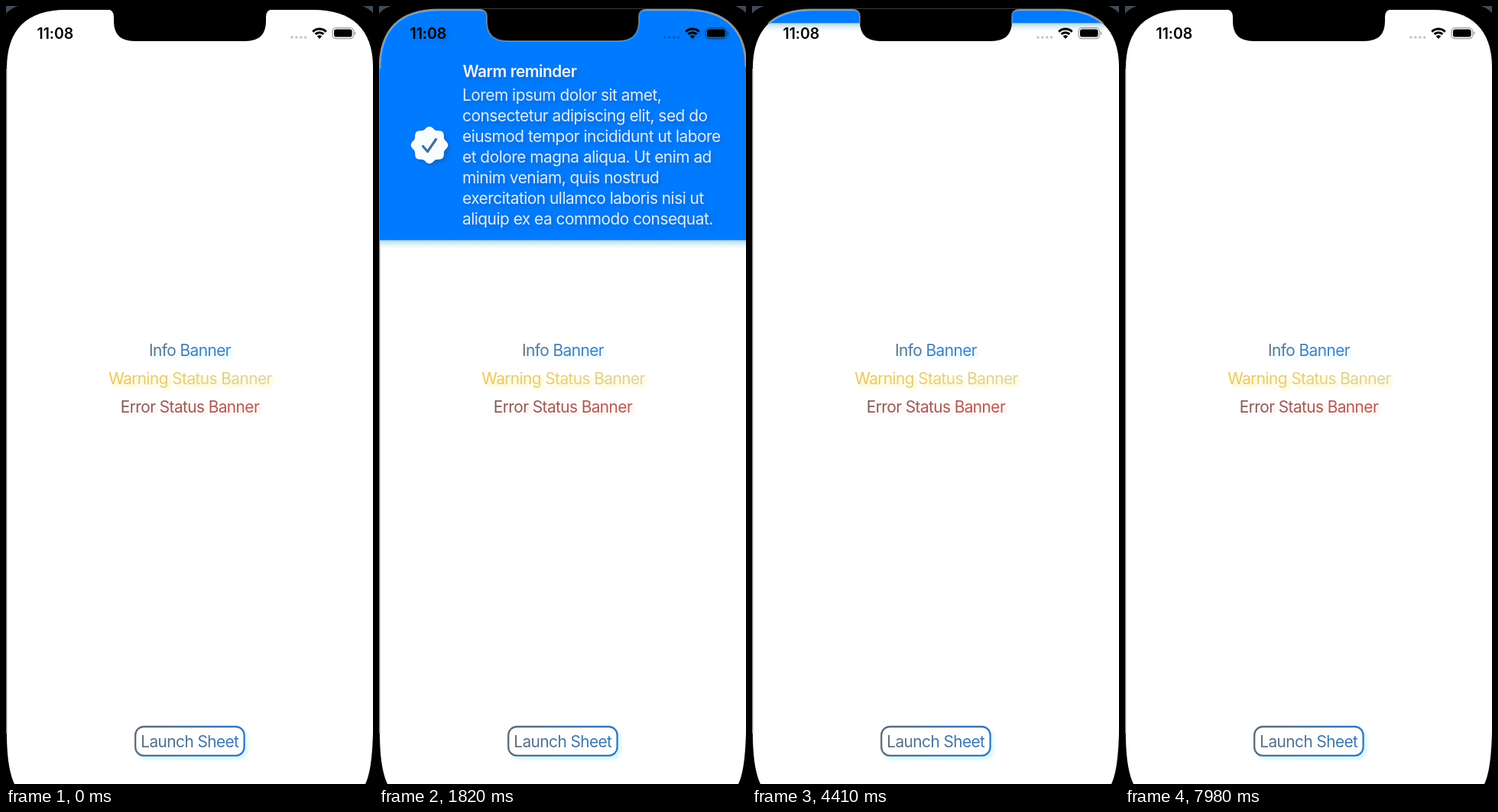
An HTML page that plays this animation: 480x1018 px, repeating every 8000 ms.

```html
<!DOCTYPE html>
<html lang="en">
<head>
<meta charset="utf-8">
<title>Status banners</title>
<style>
  html, body { margin: 0; width: 100%; height: 100%; overflow: hidden; background: #000; }
  svg { display: block; width: 100vw; height: 100vh; }
  text { font: 400 20.85px Inter, "Liberation Sans", sans-serif; letter-spacing: -.49px; }
  .mid { text-anchor: middle; }
  .button { letter-spacing: -.58px; }
  .bold { font-weight: 600; }
  .clock { font-size: 19.5px; letter-spacing: -.1px; }
  .info { filter: drop-shadow(4px 4px 2px rgba(150, 235, 255, .42)); }
  .warn { filter: drop-shadow(4px 4px 2px rgba(255, 236, 90, .55)); }
  .error { filter: drop-shadow(4px 4px 2px rgba(255, 180, 170, .35)); }
  .onBlue { filter: drop-shadow(3px 3px 2px rgba(60, 80, 115, .55)); }
  .onYellow { filter: drop-shadow(3px 3px 2px rgba(140, 105, 0, .4)); }
</style>
</head>
<body>
<svg viewBox="0 0 480 1018" preserveAspectRatio="none">
  <defs>
    <clipPath id="screenClip"><use href="#screen"/></clipPath>
    <clipPath id="coverClip"><rect id="cover" width="480" height="0"/></clipPath>
    <linearGradient id="gInfo" gradientUnits="userSpaceOnUse" x1="187" y1="0" x2="294" y2="0">
      <stop stop-color="#66727f"/><stop offset=".5" stop-color="#447db9"/><stop offset="1" stop-color="#3583d6"/>
    </linearGradient>
    <linearGradient id="gWarn" gradientUnits="userSpaceOnUse" x1="134" y1="0" x2="348" y2="0">
      <stop stop-color="#ebc566"/><stop offset=".5" stop-color="#e4cf80"/><stop offset="1" stop-color="#dbd1ad"/>
    </linearGradient>
    <linearGradient id="gError" gradientUnits="userSpaceOnUse" x1="149" y1="0" x2="332" y2="0">
      <stop stop-color="#7a5d5a"/><stop offset=".5" stop-color="#a35a55"/><stop offset="1" stop-color="#c1564e"/>
    </linearGradient>
    <linearGradient id="gSheet" gradientUnits="userSpaceOnUse" x1="169" y1="0" x2="312" y2="0">
      <stop stop-color="#5f6b78"/><stop offset=".5" stop-color="#47749d"/><stop offset="1" stop-color="#3578bf"/>
    </linearGradient>
    <linearGradient id="glow" x2="0" y2="1">
      <stop stop-color="#86c6e2" stop-opacity=".7"/><stop offset="1" stop-color="#d4f0fa" stop-opacity="0"/>
    </linearGradient>
    <linearGradient id="shade" x2="0" y2="1">
      <stop stop-color="#99958a" stop-opacity=".5"/><stop offset="1" stop-color="#ddd" stop-opacity="0"/>
    </linearGradient>
  </defs>

  <path d="M0 0H16Q6 3 0 10ZM480 0H466Q474 3 480 9Z" fill="#414b55"/>
  <path id="screen" fill="#fff" d="M1 82C1 30 28 5 78 5H402C452 5 480 30 480 80V950C479 985 476 1005 470 1018H11C5 1005 1 985 1 950Z"/>
  <rect y="82" width="1.3" height="870" fill="#7b7b7b"/>

  <text class="mid button info" x="240.5" y="458" fill="url(#gInfo)">Info Banner</text>
  <text class="mid button warn" x="241" y="495" fill="url(#gWarn)">Warning Status Banner</text>
  <text class="mid button error" x="240.5" y="532" fill="url(#gError)">Error Status Banner</text>
  <g class="info">
    <rect x="169.2" y="943" width="142.4" height="37.8" rx="11" fill="#fff" stroke="url(#gSheet)" stroke-width="2.3"/>
    <text class="mid button" x="240.3" y="970" fill="url(#gSheet)">Launch Sheet</text>
  </g>

  <g clip-path="url(#screenClip)">
    <g id="blue">
      <rect y="306.5" width="480" height="12" fill="url(#glow)"/>
      <rect y="-40" width="480" height="346.5" fill="#007aff"/>
      <g class="onBlue">
        <path id="seal" fill="#f7fdff"/>
        <path d="M57.5 183.5L63.5 190.5L74.5 174.5" fill="none" stroke="#426f9c" stroke-width="3.2" stroke-linecap="round" stroke-linejoin="round"/>
      </g>
      <g id="copy" class="onBlue" fill="#d8eefc">
        <text class="bold" x="109.5" y="93" fill="#e6f5ff">Warm reminder</text>
      </g>
    </g>
    <g id="yellow">
      <rect y="114" width="480" height="11" fill="url(#shade)"/>
      <rect y="-40" width="480" height="154" fill="#ffcc00"/>
      <text class="mid onYellow" x="240.5" y="93" fill="#241c04">Running out of time!</text>
    </g>
  </g>

  <g clip-path="url(#coverClip)" fill="none" stroke="#a3a29c" stroke-opacity=".7" stroke-width="3">
    <use href="#rim"/>
    <use href="#notch"/>
  </g>
  <path id="rim" fill="none" d="M1 82C1 30 28 5 78 5H402C452 5 480 30 480 80"/>
  <path id="notch" d="M132 4Q141 5 141 14V20Q141 46 168 46H313Q340 46 340 20V14Q340 5 349 4Z" stroke="none"/>
  <g clip-path="url(#coverClip)" fill="none" stroke="#a3a29c" stroke-opacity=".6" stroke-width="2">
    <path d="M132 5Q141 5 141 14V20Q141 46 168 46H313Q340 46 340 20V14Q340 5 349 5"/>
    <path d="M1 82C1 30 28 5 78 5H132M349 5H402C452 5 480 30 480 80"/>
  </g>

  <g id="status">
    <text class="bold clock" x="40.5" y="42.5">11:08</text>
    <g id="dots" fill-opacity=".23"></g>
    <path d="M401.3 33.6A12.3 12.3 0 0 1 418.7 33.6M404.6 36.9A7.7 7.7 0 0 1 415.4 36.9" fill="none" stroke="#000" stroke-width="2.9"/>
    <path d="M410 43L406.7 39.6A4.7 4.7 0 0 1 413.3 39.6Z"/>
    <rect x="427" y="28.6" width="27.6" height="14" rx="4.5" fill="none" stroke="#000" stroke-opacity=".38" stroke-width="1.3"/>
    <rect x="429" y="30.6" width="23.6" height="10" rx="2.8"/>
    <path d="M456 33Q458.6 35.6 456 38.2Z" fill-opacity=".45"/>
  </g>
</svg>
<script>
const LOOP = 8000, STEP = 70, SETTLE = 650;
const $ = id => document.getElementById(id);

function add(parent, tag, attrs, text) {
  const el = document.createElementNS("http://www.w3.org/2000/svg", tag);
  for (const k in attrs) el.setAttribute(k, attrs[k]);
  if (text) el.textContent = text;
  parent.appendChild(el);
}

["Lorem ipsum dolor sit amet,", "consectetur adipiscing elit, sed do",
 "eiusmod tempor incididunt ut labore", "et dolore magna aliqua. Ut enim ad",
 "minim veniam, quis nostrud", "exercitation ullamco laboris nisi ut",
 "aliquip ex ea commodo consequat."
].forEach((line, i) => add($("copy"), "text", { x: 109, y: 124 + 27 * i }, line));

for (let i = 0; i < 4; i++) add($("dots"), "circle", { cx: 374 + 5.9 * i, cy: 41, r: 1.8 });

// eight soft lobes around the check mark
let seal = "";
for (let i = 0; i < 96; i++) {
  const a = i / 96 * 2 * Math.PI, r = 22.6 + 1.7 * Math.cos(8 * a);
  seal += (i ? "L" : "M") + (66 + r * Math.cos(a)).toFixed(2) + " " + (182 + r * Math.sin(a)).toFixed(2);
}
$("seal").setAttribute("d", seal + "Z");

// share of the way left to go, ms after the start
function spring(ms) {
  if (ms <= 0) return 1;
  if (ms >= SETTLE) return 0;
  const t = ms / 1000, w = 2 * Math.PI / 0.55, z = 0.825;
  const d = w * Math.sqrt(1 - z * z);
  return Math.exp(-z * w * t) * (Math.cos(d * t) + z * w / d * Math.sin(d * t));
}

const banners = [
  { id: "blue", rest: 306.5, travel: 302, enter: 954, leave: 4110, look: "onBlue" },
  { id: "yellow", rest: 114, travel: 110, enter: 5268, leave: 6282, look: "onYellow" }
];

function draw(time) {
  let look = "", bottom = 0;
  for (const b of banners) {
    const up = time < b.leave ? spring(time - b.enter) : 1 - spring(time - b.leave);
    const shown = time > b.enter && time < b.leave + SETTLE;
    const y = -b.travel * up;
    $(b.id).setAttribute("transform", `translate(0 ${y.toFixed(2)})`);
    $(b.id).setAttribute("visibility", shown ? "visible" : "hidden");
    if (!shown) continue;
    bottom = Math.max(0, b.rest + y);
    if (bottom > 36) look = b.look;
  }
  $("cover").setAttribute("height", bottom.toFixed(2));
  $("status").setAttribute("class", look);
}

const start = performance.now();
function tick() {
  const t = (performance.now() - start) % LOOP;
  draw(Math.floor(t / STEP) * STEP);
  requestAnimationFrame(tick);
}
tick();
</script>
</body>
</html>
```
